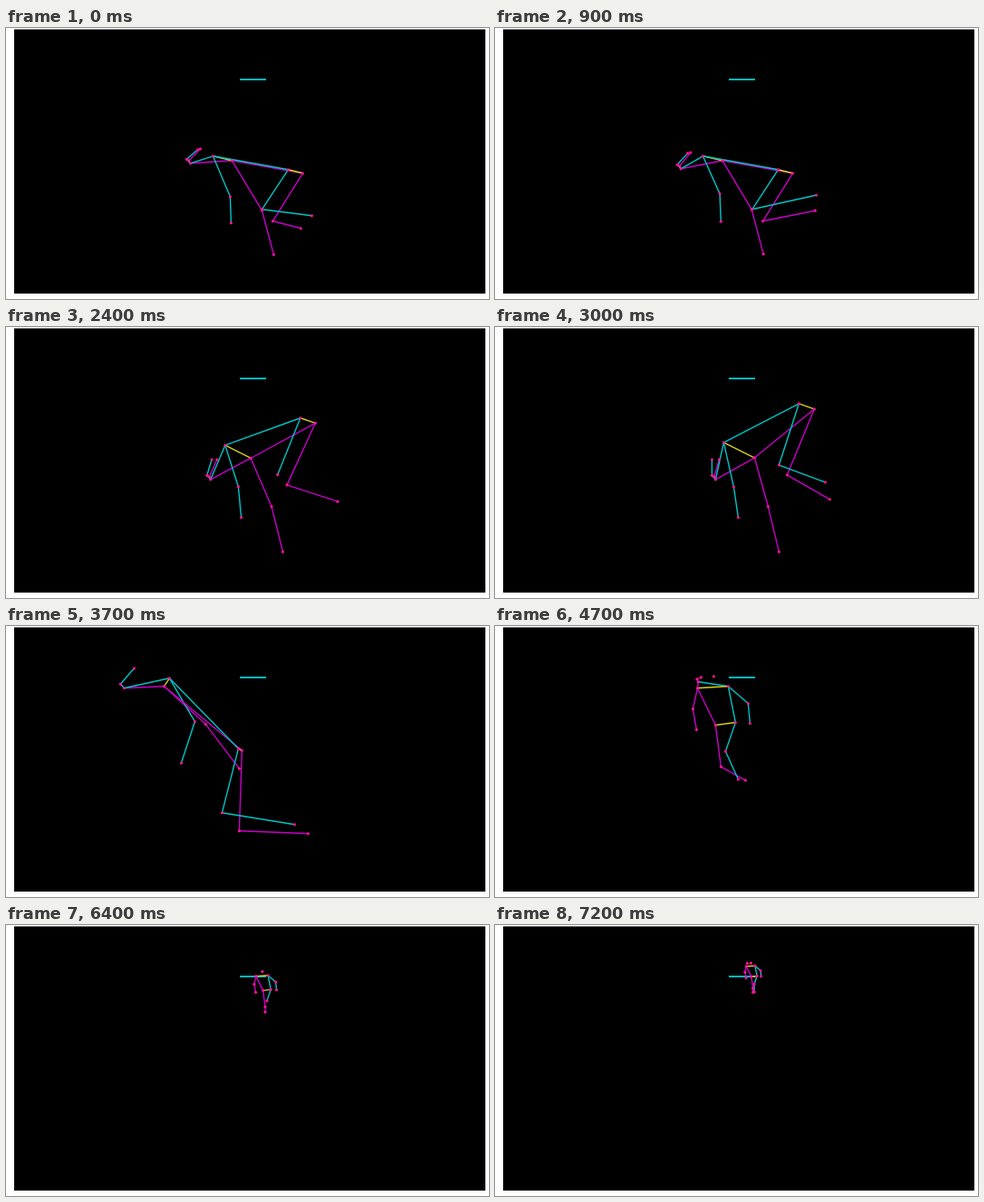
An HTML page with a canvas for the animation above (7.3 s loop, 533 by 300 pixels).

```html
<!DOCTYPE html>
<html lang="en">
<head>
<meta charset="utf-8">
<title>Pose tracking</title>
<style>
html, body { margin: 0; width: 100%; height: 100%; overflow: hidden; background: #fff; }
canvas { display: block; }
</style>
</head>
<body>
<canvas id="stage" width="533" height="300"></canvas>
<script>
const ctx = document.getElementById('stage').getContext('2d');
const LOOP = 7300, STEP = 100;
const CYAN = '#00c4c6', MAGENTA = '#c800c8', YELLOW = '#d8d020', PINK = '#ff1493';

const limbs = ['shoulder', 'elbow', 'wrist', 'hip', 'knee', 'ankle'];
const names = ['nose', 'earL', 'earR', ...limbs.map(n => n + 'L'), ...limbs.map(n => n + 'R')];

function pose(head, left, right) {
  const points = [...head, ...left, ...right];
  return Object.fromEntries(names.map((name, i) => [name, points[i]]));
}

const crouch = pose(
  [[203, 150], [214, 134], [211, 135]],
  [[249, 147], [282, 202], [295, 251], [327, 161], [294, 214], [325, 222]],
  [[228, 142], [247, 187], [248, 216], [311, 157], [282, 201], [337, 208]]);
const hipsUp = pose(
  [[243, 169], [247, 147], [239, 147]],
  [[286, 145], [301, 199], [313, 249], [352, 91], [322, 164], [369, 191]],
  [[252, 128], [263, 177], [268, 211], [335, 85], [313, 153], [364, 172]]);
const leap = pose(
  [[130, 69], [141, 47], [141, 47]],
  [[174, 67], [220, 109], [257, 158], [260, 138], [257, 227], [333, 230]],
  [[180, 58], [208, 106], [193, 152], [256, 136], [238, 207], [318, 220]]);
const stand = pose(
  [[224, 62], [227, 57], [241, 56]],
  [[223, 69], [218, 92], [222, 115], [243, 110], [249, 156], [276, 171]],
  [[257, 67], [279, 86], [281, 108], [265, 107], [254, 139], [268, 170]]);

const bones = [
  [MAGENTA, 'earL eyeL nose shoulderL elbowL wristL'],
  [CYAN, 'earR eyeR nose shoulderR elbowR wristR'],
  [YELLOW, 'shoulderL shoulderR'],
  [MAGENTA, 'shoulderL hipL'],
  [CYAN, 'shoulderR hipR'],
  [YELLOW, 'hipL hipR'],
  [MAGENTA, 'hipL kneeL ankleL'],
  [CYAN, 'hipR kneeR ankleR']
].map(([color, chain]) => [color, chain.split(' ')]);

// Spans in which the tracker loses a joint.
const lost = {
  nose: [[6400, LOOP]],
  eyeL: [[3400, 4200], [5200, LOOP]],
  eyeR: [[4200, LOOP]],
  earL: [[3400, 4200], [5200, 6400]],
  ankleR: [[1400, 2400], [5200, 6400]]
};
const visible = (name, t) => !(lost[name] || []).some(([from, to]) => t >= from && t <= to);

const mix = (a, b, u) => a + (b - a) * u;
const blend = (p, q, u, v = u) => [mix(p[0], q[0], u), mix(p[1], q[1], v)];
const ramp = (t, from, to) => Math.min(1, Math.max(0, (t - from) / (to - from)));
function smooth(t, from, to) {
  const u = ramp(t, from, to);
  return u * u * (3 - 2 * u);
}

// Head and arms sink first, the feet kick early, the hips rise late.
function crouching(name, t) {
  const late = smooth(t, 1600, 2750);
  const kick = mix(0.65 * smooth(t, 0, 1000), 1, late);
  if (name.startsWith('ankle')) return blend(crouch[name], hipsUp[name], kick);
  const early = /nose|ear|elbow|wrist/.test(name);
  return blend(crouch[name], hipsUp[name],
    ramp(t, 0, 3000) ** 2.6, early ? smooth(t, 0, 2400) : late);
}

// The figure shrinks towards a vanishing point while its lower legs straighten.
function walkingAway(name, t) {
  const d = (t - 4700) / 1000;
  const scale = 1 / (1 + 0.7 * d + 0.13 * d * d);
  const vanish = blend([320, 61], [298, 37], smooth(t, 5600, 7200));
  let [x, y] = stand[name];
  if (name.startsWith('ankle')) {
    const knee = stand[name.replace('ankle', 'knee')];
    x = mix(x, knee[0], smooth(t, 4700, 5600));
  }
  return blend(vanish, [x, y], scale);
}

function jointsAt(t) {
  const joints = {};
  for (const name of names) {
    let p = crouching(name, t);
    p = blend(p, leap[name], ramp(t, 3000, 3700) ** 2);
    joints[name] = blend(p, walkingAway(name, t), smooth(t, 3700, 4400));
  }
  const [x, y] = joints.nose;
  joints.eyeL = [x - 1.5, y - 3];
  joints.eyeR = [x - 4, y - 4.5];
  for (const name in joints) {
    if (!visible(name, t)) delete joints[name];
  }
  return joints;
}

function line(a, b, color, width) {
  ctx.strokeStyle = color;
  ctx.lineWidth = width;
  ctx.beginPath();
  ctx.moveTo(...a);
  ctx.lineTo(...b);
  ctx.stroke();
}

function draw(t) {
  ctx.setTransform(1, 0, 0, 1, 0, 0);
  ctx.fillStyle = '#fff';
  ctx.fillRect(0, 0, 533, 300);
  ctx.fillStyle = '#000';
  ctx.fillRect(9, 1.5, 520, 292.5);
  line([258, 57], [287, 57], '#00b8bc', 2);

  ctx.translate(0.4, -0.2);
  const joints = jointsAt(t);
  for (const [color, chain] of bones) {
    for (let i = 1; i < chain.length; i++) {
      const a = joints[chain[i - 1]], b = joints[chain[i]];
      if (a && b) line(a, b, color, 1.4);
    }
  }
  ctx.fillStyle = PINK;
  for (const [x, y] of Object.values(joints)) {
    ctx.beginPath();
    ctx.arc(x, y, 1.6, 0, Math.PI * 2);
    ctx.fill();
  }
}

function tick() {
  draw(Math.floor(performance.now() % LOOP / STEP) * STEP);
  requestAnimationFrame(tick);
}
tick();
</script>
</body>
</html>
```
